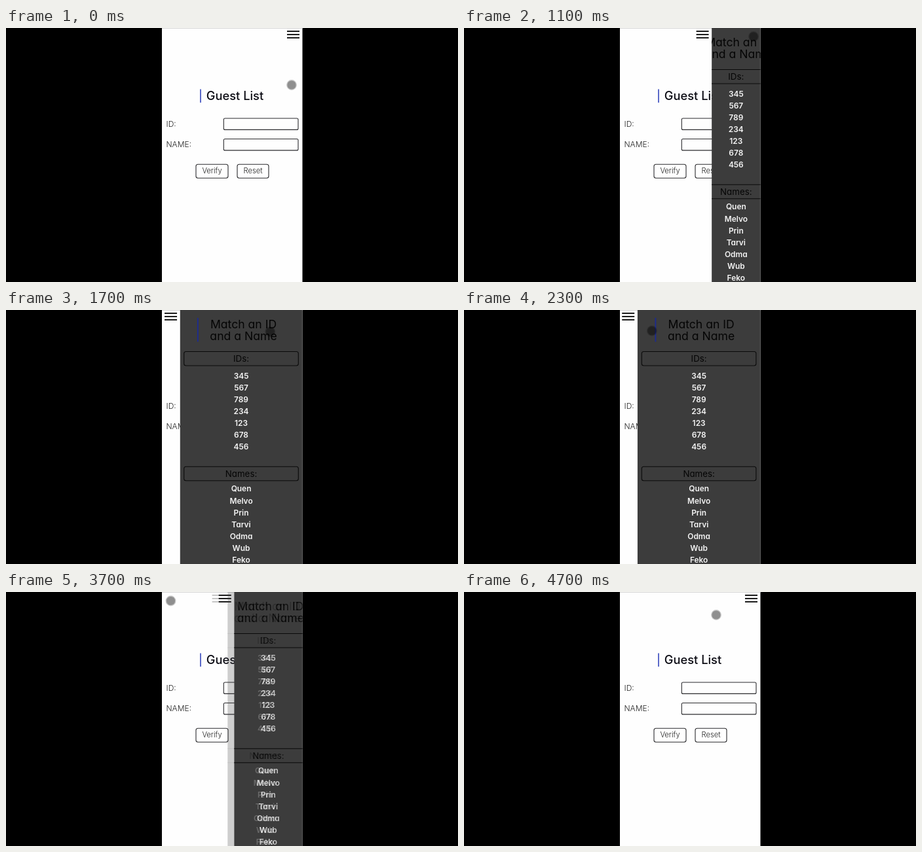
An HTML page that plays this animation: 690 by 388 pixels, repeating every 5.2 s.

```html
<!DOCTYPE html>
<html lang="en">
<head>
<meta charset="utf-8">
<title>Guest List</title>
<style>
html, body { margin: 0; width: 100%; height: 100%; overflow: hidden; background: #000; }
svg { display: block; }
text { font-family: Inter, Lato, sans-serif; font-feature-settings: "cv11"; }
.mid { text-anchor: middle; }
.box { fill: none; stroke: #2b2b2e; stroke-width: 1.1; }
.label { font-size: 12px; font-weight: 300; fill: #222; }
.button { font-size: 11.2px; font-weight: 300; fill: #222; }
.title { font-size: 17.6px; fill: #050505; }
.head { font-size: 13.3px; fill: #050505; }
.item { font-size: 11.9px; font-weight: 600; fill: #f4f4f4; }
.menu .box { stroke: #0a0a0a; }
</style>
</head>
<body>
<svg id="stage" width="690" height="388" viewBox="0 0 690 388">
  <rect width="690" height="388"/>
  <rect x="238" width="214.5" height="388" fill="#fefefe"/>
  <rect x="238" width="214.5" height="1" fill="#d8d8d8"/>
  <path d="M297 93.5V114" stroke="#3344bb" stroke-width="1.6"/>
  <text class="mid" x="349.5" y="110.3" font-size="18.3" font-weight="500" fill="#0c0c14">Guest List</text>
  <text class="label" x="244.5" y="150.6">ID:</text>
  <text class="label" x="244.5" y="182.2">NAME:</text>
  <rect class="box" x="332.3" y="138" width="113.7" height="17.4" rx="2"/>
  <rect class="box" x="332.3" y="169.5" width="113.7" height="17.4" rx="2"/>
  <rect class="box" x="290" y="208.3" width="49" height="21" rx="3"/>
  <rect class="box" x="353" y="208.3" width="48" height="21" rx="3"/>
  <text class="button mid" x="314.5" y="222.4">Verify</text>
  <text class="button mid" x="377" y="222.4">Reset</text>

  <g class="menu">
    <path class="bars" d="M0 5H19M0 10H19M0 15H19" stroke="#1c1c1c" stroke-width="2"/>
    <svg class="panel" height="388">
      <rect width="300" height="388" fill="#3c3c3c"/>
      <g class="content mid">
        <path d="M-66.2 12V48.5" stroke="#1b2a92" stroke-width="1.8"/>
        <text class="title" x="3.5" y="28">Match an ID</text>
        <text class="title" x="3.5" y="46.2">and a Name</text>
        <rect class="box" x="-87.3" y="63.5" width="174.6" height="21.5" rx="3"/>
        <text class="head" y="78.8">IDs:</text>
        <rect class="box" x="-87.3" y="239.2" width="174.6" height="21.5" rx="3"/>
        <text class="head" y="254.6">Names:</text>
      </g>
    </svg>
  </g>

  <g id="cursor">
    <circle r="7.9" fill="#000" fill-opacity=".22"/>
    <circle r="6.6" fill="#000" fill-opacity=".28"/>
  </g>
</svg>
<script>
const LOOP = 5200, STEP = 100, RIGHT = 452.5, OPEN = 264.7;
const $ = (s, root = document) => root.querySelector(s);

function addItems(words, y) {
  words.split(' ').forEach((word, i) => {
    const el = document.createElementNS('http://www.w3.org/2000/svg', 'text');
    el.setAttribute('class', 'item');
    el.setAttribute('y', y + i * 18.1);
    el.textContent = word;
    $('.content').append(el);
  });
}
addItems('345 567 789 234 123 678 456', 104.7);
addItems('Quen Melvo Prin Tarvi Odma Wub Feko', 277.4);

const menu = $('.menu');
const trail = menu.cloneNode(true);
trail.setAttribute('opacity', .25);
menu.after(trail);

const span = (t, a, b) => Math.min(1, Math.max(0, (t - a) / (b - a)));
const smooth = u => u * u * (3 - 2 * u);
const mix = (a, b, u) => a + (b - a) * u;

// CSS "ease": cubic-bezier(.25, .1, .25, 1)
function ease(x) {
  if (x <= 0 || x >= 1) return x;
  const curve = (s, a, b) => 3 * s * (1 - s) * ((1 - s) * a + s * b) + s ** 3;
  let lo = 0, hi = 1;
  for (let i = 0; i < 20; i++) {
    const m = (lo + hi) / 2;
    if (curve(m, .25, .25) < x) lo = m; else hi = m;
  }
  return curve(lo, .1, 1);
}

function panelX(t) {
  const shown = ease(span(t, 880, 1780)) - ease(span(t, 3460, 4360));
  return mix(RIGHT, OPEN, shown);
}

function placeMenu(root, x) {
  const width = RIGHT - x, panel = $('.panel', root);
  panel.setAttribute('x', x);
  panel.setAttribute('width', width);
  $('.content', root).setAttribute('transform', `translate(${width / 2})`);
  $('.bars', root).setAttribute('transform', `translate(${x - 23.5})`);
}

function cursorAt(t) {
  if (t < 1300) {
    const u = smooth(span(t, 0, 650));
    return [mix(436, 442, u), mix(87, 13, u)];
  }
  if (t < 3700) {
    const u = smooth(span(t, 1300, 2680));
    return [mix(442, 251.5, u), 13 + 124 * u * (1 - u)];
  }
  const u = smooth(span(t, 3700, 4350));
  return [mix(251.5, 385, u), mix(13.5, 35, u)];
}

const start = performance.now();
function frame() {
  const now = (performance.now() - start) % LOOP;
  const t = Math.floor(now / STEP) * STEP;
  placeMenu(menu, panelX(t));
  placeMenu(trail, panelX(t - 22));
  // Motion blur only while the menu closes
  trail.style.display = t > 3460 && t < 4360 ? '' : 'none';
  $('#cursor').setAttribute('transform', `translate(${cursorAt(t)})`);
  requestAnimationFrame(frame);
}
frame();
</script>
</body>
</html>
```
